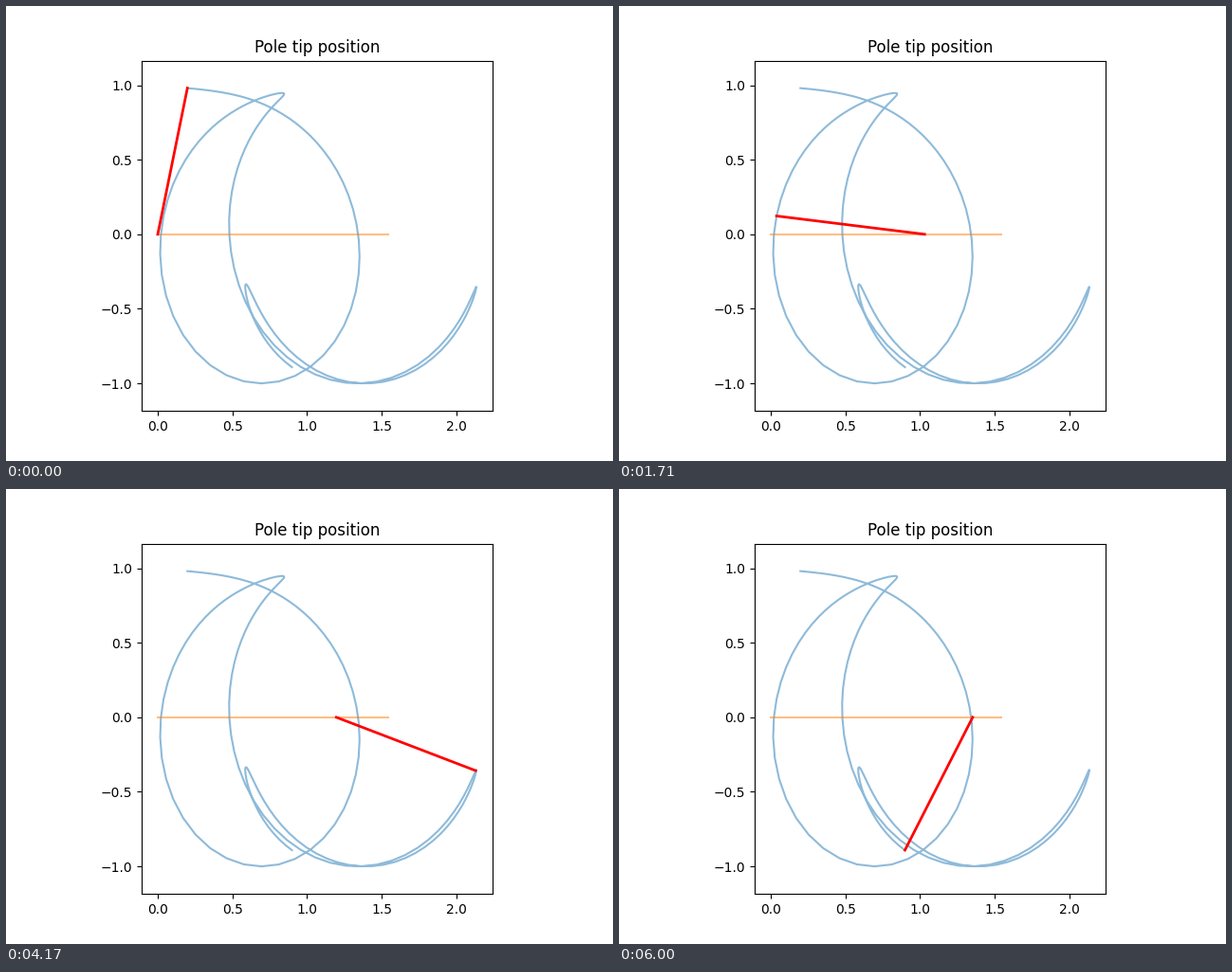
Recreate the animation shown at these times as a matplotlib script. Size 640 px wide and 480 px high, loop 6030 ms.

```python
import matplotlib.pyplot as plt
import numpy as np
from matplotlib.animation import FuncAnimation

STEPS = 201
INTERVAL = 30  # ms
MASS_RATIO = 0.2  # pole mass / total mass

# Pole angle from upright (rad) and centre of mass, by step
ANGLE = {0: 0.2, 10: 0.315, 21: 0.592, 36: 1.721, 46: 3.142, 56: 4.712,
         63: 5.389, 70: 5.737, 81: 5.956, 94: 5.757, 105: 5.177, 110: 4.704,
         122: 3.235, 132: 2.185, 142: 1.936, 152: 2.257, 164: 3.28,
         174: 4.108, 183: 4.371, 189: 4.261, 200: 3.613}
CENTRE = {0: 0.04, 36: 0.562, 63: 0.902, 84: 1.104, 105: 1.252,
          126: 1.352, 152: 1.396, 178: 1.364, 200: 1.263}


def spline(keys, t):
    """Natural cubic spline through the key points."""
    x, y = np.array(list(keys.items()), float).T
    h, n = np.diff(x), len(x)
    a, b = np.eye(n), np.zeros(n)
    for i in range(1, n - 1):
        a[i, i - 1:i + 2] = h[i - 1], 2 * (h[i - 1] + h[i]), h[i]
    b[1:-1] = 6 * np.diff(np.diff(y) / h)
    curv = np.linalg.solve(a, b)

    i = np.clip(np.searchsorted(x, t, side="right") - 1, 0, n - 2)
    u = (t - x[i]) / h[i]
    v = 1 - u
    bend = (v ** 3 - v) * curv[i] + (u ** 3 - u) * curv[i + 1]
    return v * y[i] + u * y[i + 1] + h[i] ** 2 / 6 * bend


steps = np.arange(STEPS)
theta = spline(ANGLE, steps)
# The cart recoils against the swinging pole
cart = spline(CENTRE, steps) - MASS_RATIO * np.sin(theta)
cart -= cart[0]
tip_x = cart + np.sin(theta)
tip_y = np.cos(theta)

fig, ax = plt.subplots(figsize=(6.4, 4.8), dpi=100)
ax.set_title("Pole tip position")
ax.plot(tip_x, tip_y, color="C0", alpha=0.5)
ax.plot(cart, np.zeros(STEPS), color="C1", alpha=0.5)
pole, = ax.plot([], [], color="red", lw=2)

reach = 2.136
side, mid = 1.1 * reach, -0.01
ax.set_xlim(-0.05 * reach, 1.05 * reach)
ax.set_ylim(mid - side / 2, mid + side / 2)
ax.set_aspect("equal", adjustable="box")


def update(i):
    pole.set_data([cart[i], tip_x[i]], [0, tip_y[i]])
    return pole,


def init():
    return update(0)


anim = FuncAnimation(fig, update, frames=STEPS, init_func=init,
                     interval=INTERVAL, repeat=True, repeat_delay=0)
plt.show()
```
